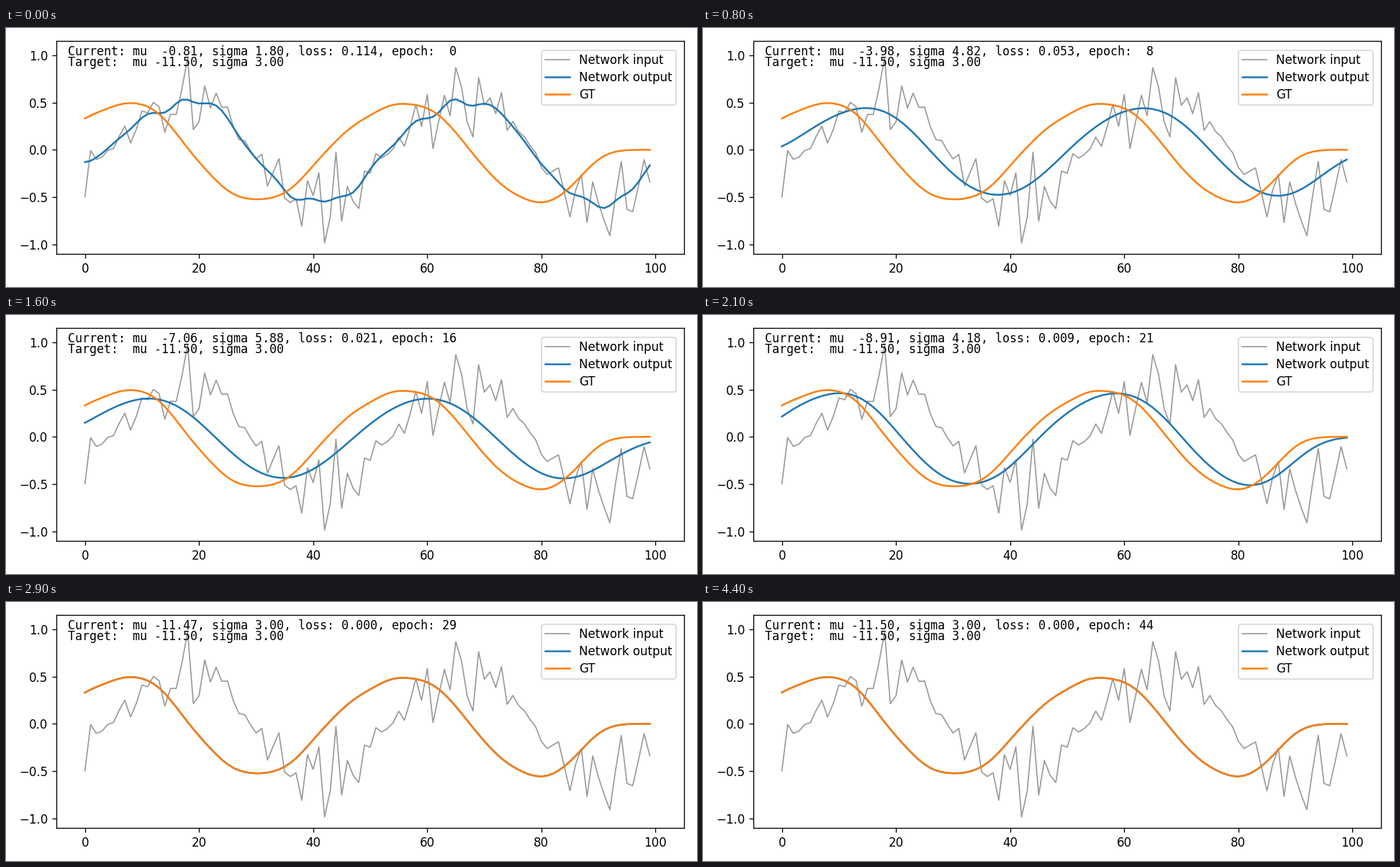
Animation, 960 px wide and 360 px high, one loop 4500 ms. Source, as a matplotlib script:

```python
import numpy as np
import matplotlib.pyplot as plt
from matplotlib.animation import FuncAnimation

WIDTH, HEIGHT, DPI = 960, 360, 120
EPOCHS = 45
SAMPLES = 100
TARGET = (-11.5, 3.0)
MONO = "DejaVu Sans Mono"

# Key points of the training run: mu and sigma per epoch.
KEY_EPOCHS = np.array([0, 4, 8, 12, 16, 21, 25, 29, 33, 37])
KEY_MU = [-.81, -2.40, -3.98, -5.54, -7.06, -8.91, -10.33, -11.47, -11.5, -11.5]
KEY_SIGMA = [1.80, 3.36, 4.82, 5.83, 5.88, 4.18, 3.28, 3.0, 3.0, 3.0]

x = np.arange(SAMPLES)


def make_signal(seed=4):
    """Two sine periods, each sample scaled by a random factor in 0..1."""
    rng = np.random.default_rng(seed)
    # Every four neighbours cover the range evenly, so local means stay steady.
    spread = np.concatenate([(rng.permutation(4) + rng.random(4)) / 4
                             for _ in range(SAMPLES // 4)])
    level = np.interp(x, [0, 12, 16, 26, 33, 38, 43, 65, 74, 92],
                      [.5, .33, .5, .75, .5, .67, .5, .5, .68, .56])
    reach = np.minimum(level, 1 - level)
    wave = np.sin(4 * np.pi * x / (SAMPLES - 1) - np.pi / 6)
    return wave * (level + reach * (2 * spread - 1))


def blur(mu, sigma):
    """Shifted Gaussian filter with zero padding and a half-sample offset."""
    d = x[None, :] - (x[:, None] - mu - 0.5)
    kernel = np.exp(-0.5 * (d / sigma) ** 2) / (sigma * np.sqrt(2 * np.pi))
    return kernel @ signal


def smooth(t, times, values):
    """Cubic Hermite curve through the key points."""
    slopes = np.gradient(values, times)
    t = min(t, times[-1])
    k = int(np.clip(np.searchsorted(times, t, side="right") - 1,
                    0, len(times) - 2))
    h = times[k + 1] - times[k]
    u = (t - times[k]) / h
    return ((1 + 2 * u) * (1 - u) ** 2 * values[k]
            + u * (1 - u) ** 2 * h * slopes[k]
            + u * u * (3 - 2 * u) * values[k + 1]
            + u * u * (u - 1) * h * slopes[k + 1])


def params(epoch):
    return (smooth(epoch, KEY_EPOCHS, KEY_MU),
            smooth(epoch, KEY_EPOCHS, KEY_SIGMA))


def describe(mu, sigma):
    return f"mu {mu:6.2f}, sigma {sigma:.2f}"


signal = make_signal()
truth = blur(*TARGET)

fig = plt.figure(figsize=(WIDTH / DPI, HEIGHT / DPI), dpi=DPI)
ax = fig.add_axes([70 / WIDTH, 46 / HEIGHT, 872 / WIDTH, 296 / HEIGHT])
ax.set_xlim(-5, 105)
ax.set_ylim(-1.1, 1.15)
ax.plot(x, signal, color="0.6", lw=1, label="Network input")
out_line, = ax.plot(x, truth, color="C0", label="Network output")
ax.plot(x, truth, color="C1", label="GT")
ax.legend(loc="upper right", bbox_to_anchor=(0.987, 0.955),
          borderaxespad=0, borderpad=0.3, labelspacing=0.36)
status = ax.text(-3, 1.0, "", family=MONO)
ax.text(-3, 0.885, f"Target:  {describe(*TARGET)}", family=MONO)


def update(epoch):
    now = params(epoch)
    out = blur(*now)
    # The loss is measured before the step that leads to this epoch's values.
    loss = 0.5 * np.mean((blur(*params(epoch - 1)) - truth) ** 2)
    out_line.set_ydata(out)
    status.set_text(f"Current: {describe(*now)}, "
                    f"loss: {loss:.3f}, epoch: {epoch:2d}")
    return out_line, status


anim = FuncAnimation(fig, update, frames=EPOCHS, interval=100, repeat=True)
plt.show()
```
